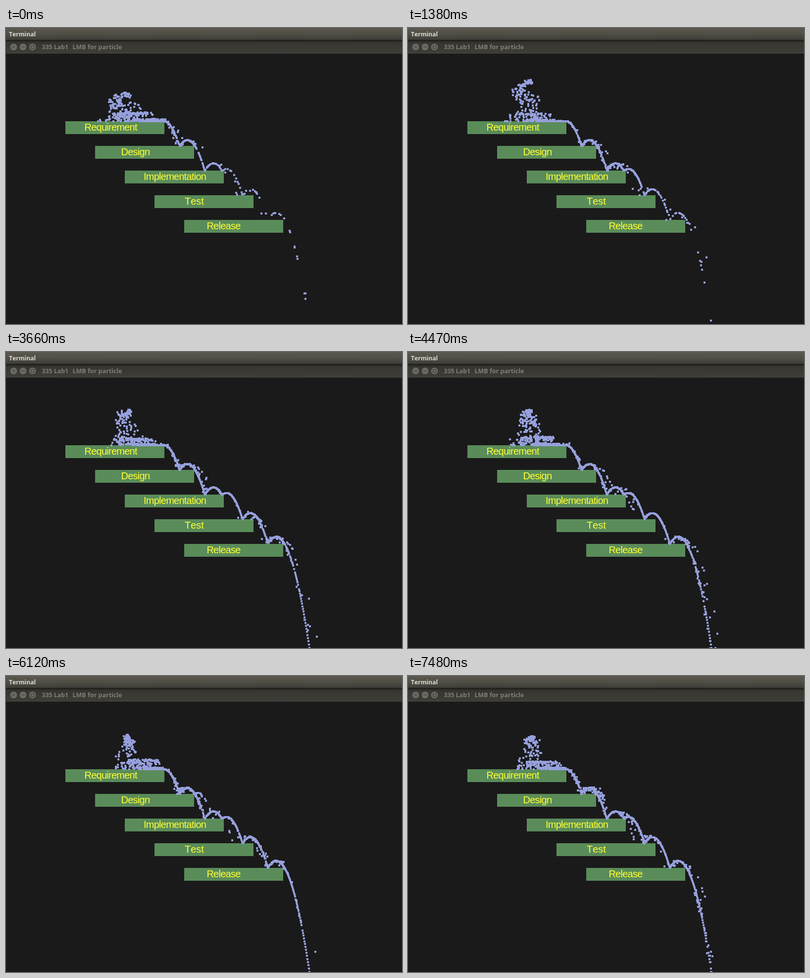
An HTML page with a canvas for the animation above (7.58 s loop, 800 by 600 pixels).

```html
<!DOCTYPE html>
<html lang="en">
<head>
<meta charset="utf-8">
<title>335 Lab1</title>
<style>
html, body { margin: 0; width: 100%; height: 100%; overflow: hidden; background: #1a1a1a; }
canvas { display: block; }
</style>
</head>
<body>
<canvas id="stage" width="800" height="600"></canvas>
<script>
const ctx = document.getElementById('stage').getContext('2d');
const LOOP = 7580, FRAMES = 159, FRAME_MS = 47.32;
const STEPS = 3, STEP_MS = FRAME_MS / STEPS;
const LEAD_MS = 7200;
const GRAVITY = 0.1, BOUNCE = 0.5;

const labels = [
  { text: 'Requirement', x: 158.5, spacing: -0.75 },
  { text: 'Design', x: 232.5, spacing: -0.75 },
  { text: 'Implementation', x: 278, spacing: -0.75 },
  { text: 'Test', x: 361, spacing: 0 },
  { text: 'Release', x: 405.4, spacing: -0.75 }
];
const boxes = labels.map((l, i) => ({ x: 120 + 60 * i, y: 189 + 50 * i, w: 200, h: 26 }));

// moments in ms when no particles are made
const pauses = [[-6500, -6050], [1960, 2170], [4480, 4850]];

function seeded(seed) {
  return () => {
    seed = (seed + 0x6D2B79F5) | 0;
    let r = Math.imul(seed ^ (seed >>> 15), 1 | seed);
    r = (r + Math.imul(r ^ (r >>> 7), 61 | r)) ^ r;
    return ((r ^ (r >>> 14)) >>> 0) / 4294967296;
  };
}

// The pointer circles less and less, swings up and down, and darts aside once.
function pointerAt(t) {
  const calm = 1 - t / LOOP;
  const turn = t * Math.PI * 2 / 450;
  const swing = 14 * Math.min(1, calm) * Math.cos(t * Math.PI * 2 / 2600);
  const dart = Math.exp(-(((t - 5300) / 200) ** 2));
  return {
    x: 233 + 18 * Math.max(0, 1 - calm) + 15 * calm * Math.cos(turn) + 20 * dart,
    y: 124 + swing + 6 * calm * Math.sin(turn * 1.3) - 28 * dart
  };
}

function rateAt(t) {
  if (pauses.some(([from, to]) => t > from && t < to)) return 0;
  return 0.25 + 3.2 / (1 + Math.exp(-(t + 2900) / 400));
}

function move(p) {
  p.vy += GRAVITY;
  p.x += p.vx;
  p.y += p.vy;
  for (const b of boxes) {
    if (p.y > b.y && p.y < b.y + b.h && p.x > b.x && p.x < b.x + b.w) {
      p.y = b.y;
      p.vy *= -BOUNCE;
      p.vx = 1;
      p.x = Math.round(p.x);
    }
  }
}

function simulate() {
  const rnd = seeded(335);
  const spread = size => (rnd() - 0.5) * size;
  const frames = [];
  let parts = [], due = 0;
  for (let s = -Math.round(LEAD_MS / STEP_MS); frames.length < FRAMES; s++) {
    const t = s * STEP_MS, at = pointerAt(t);
    parts.forEach(move);
    parts = parts.filter(p => p.y < 604);
    for (due += rateAt(t) * 2 * rnd(); due >= 1; due--) {
      parts.push({
        x: Math.round(at.x + spread(6)),
        y: Math.round(at.y + spread(6)),
        vx: spread(1.6),
        vy: spread(1.1)
      });
    }
    if (s >= 0 && s % STEPS === 0) {
      frames.push(parts.map(p => [Math.round(p.x) - 2, Math.round(p.y) - 2]));
    }
  }
  return frames;
}

function gradient(y0, y1, ...stops) {
  const g = ctx.createLinearGradient(0, y0, 0, y1);
  stops.forEach((c, i) => g.addColorStop(i / (stops.length - 1), c));
  ctx.fillStyle = g;
  ctx.fillRect(0, y0, 800, y1 - y0);
}

function text(str, x, y, font, color, spacing = 0) {
  ctx.font = font;
  ctx.letterSpacing = spacing + 'px';
  ctx.fillStyle = color;
  ctx.fillText(str, x, y);
}

const glyphs = [
  (x, y) => {
    ctx.moveTo(x - 2.5, y - 2.5); ctx.lineTo(x + 2.5, y + 2.5);
    ctx.moveTo(x + 2.5, y - 2.5); ctx.lineTo(x - 2.5, y + 2.5);
  },
  (x, y) => { ctx.moveTo(x - 3.5, y); ctx.lineTo(x + 3.5, y); },
  (x, y) => ctx.rect(x - 3, y - 3, 6, 6)
];

function drawButtons() {
  ctx.lineWidth = 1;
  glyphs.forEach((glyph, i) => {
    const x = 15.5 + 19 * i, y = 38.5;
    ctx.fillStyle = '#6b6963';
    ctx.strokeStyle = '#34332f';
    ctx.beginPath();
    ctx.arc(x, y, 7.5, 0, Math.PI * 2);
    ctx.fill();
    ctx.stroke();
    ctx.strokeStyle = '#3a3935';
    ctx.beginPath();
    glyph(x, y);
    ctx.stroke();
  });
}

function drawScene() {
  ctx.fillStyle = '#1a1a1a';
  ctx.fillRect(0, 0, 800, 600);
  gradient(0, 24, '#5b594f', '#504e46', '#3d3c37');
  gradient(24, 29, '#1c1b19', '#33322e');
  gradient(29, 52, '#363530', '#3f3e39');
  const ui = '"Open Sans", "Noto Sans", sans-serif';
  text('Terminal', 6, 17, 'bold 12.1px ' + ui, '#dfdbd2');
  text('335 Lab1', 72.5, 43, 'bold 12.3px ' + ui, '#807d76');
  text('LMB for particle', 134.5, 43, 'bold 12.5px ' + ui, '#807d76');
  drawButtons();
  boxes.forEach((b, i) => {
    const l = labels[i];
    ctx.fillStyle = '#5a8c5a';
    ctx.fillRect(b.x, b.y, b.w, b.h);
    text(l.text, l.x, b.y + 19, '20px "Liberation Sans", Arial, sans-serif', '#ffff33', l.spacing);
  });
}

ctx.fontKerning = 'none';
const frames = simulate();
let start = null, shown = -1;

function draw(t) {
  const n = t < 50 ? 0 : Math.min(FRAMES - 1, 1 + Math.floor((t - 50) / FRAME_MS));
  if (n === shown) return;
  shown = n;
  drawScene();
  ctx.fillStyle = '#96a0dc';
  for (const [x, y] of frames[n]) ctx.fillRect(x, y, 4, 4);
}

function tick(now) {
  if (start === null) start = now;
  draw((now - start) % LOOP);
  requestAnimationFrame(tick);
}
draw(0);
requestAnimationFrame(tick);
</script>
</body>
</html>
```
